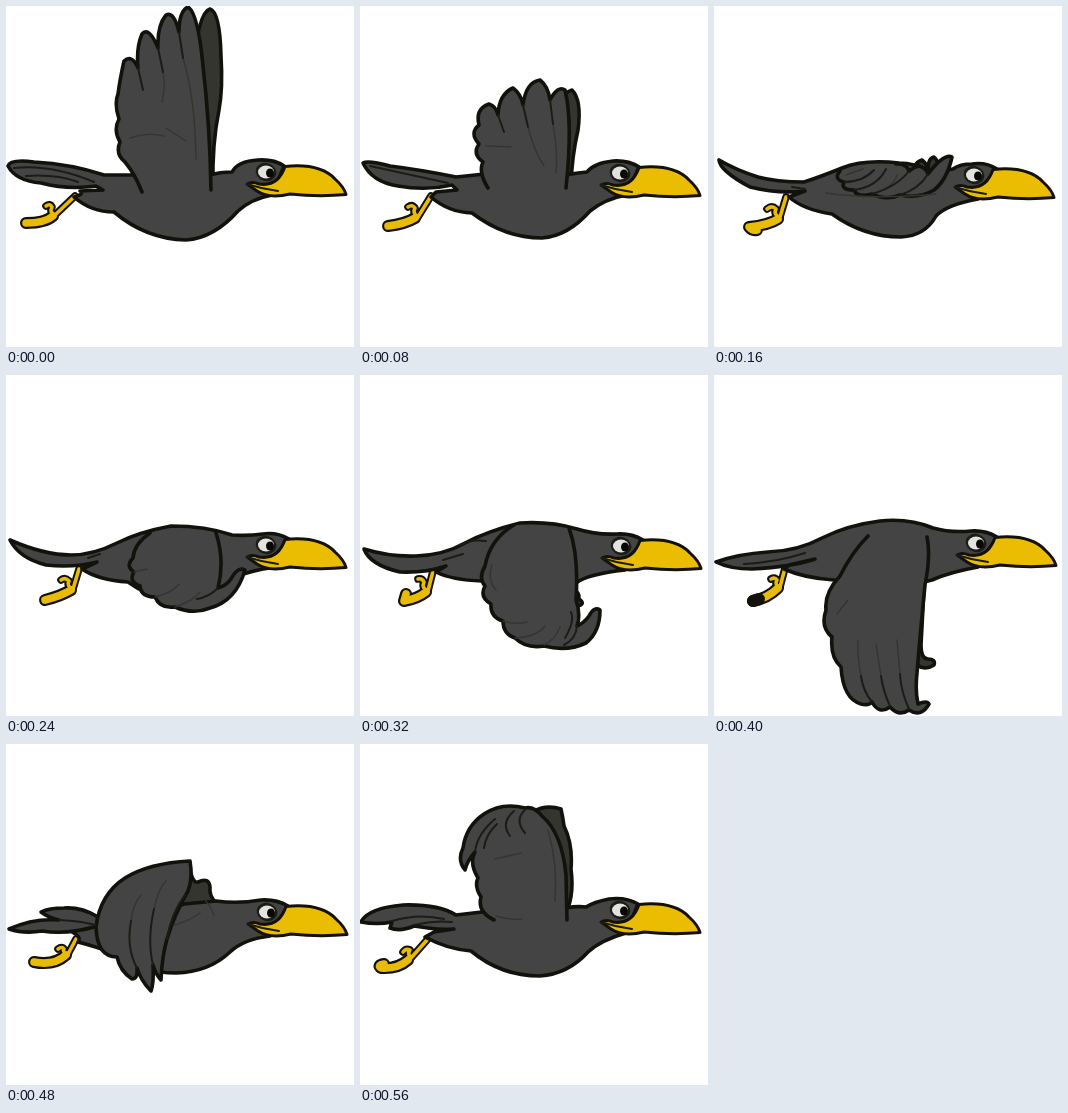
Write an HTML page that moves like this. It is 348 by 341 pixels and loops after 0.64 s.

```html
<!DOCTYPE html>
<html lang="en">
<head>
<meta charset="utf-8">
<title>Flying crow</title>
<style>
  html, body { margin: 0; width: 100%; height: 100%; overflow: hidden; background: #fff; }
  svg { display: block; width: 100%; height: 100%; }
  path { stroke-linecap: round; stroke-linejoin: round; }
  .plumage { fill: #444; stroke: #12120c; stroke-width: 3.6; }
  .far { fill: #353530; }
  .crease { fill: none; stroke: #1c1c16; stroke-width: 2; }
  .soft { fill: none; stroke: #343431; stroke-width: 1.4; }
  .legEdge { fill: none; stroke: #14110a; stroke-width: 7.6; }
  .leg { fill: none; stroke: #e8bb05; stroke-width: 3.6; }
  .toeEdge { fill: none; stroke: #14110a; stroke-width: 12; }
  .toe { fill: none; stroke: #e8bb05; stroke-width: 7.6; }
  .beak { fill: #eabd02; stroke: #14110a; stroke-width: 3; }
</style>
</head>
<body>
<svg id="stage" viewBox="0 0 348 341"></svg>
<script>
const STEP = 80;

// One entry per wing beat position; head is the offset of beak and eye.
const poses = [
  { // wings raised
    head: [0, 0],
    leg: 'M69 190L49 209Q43 207 46 201Q44 197 40 200', toe: 'M47 210Q39 217 20 217',
    far: 'M188 60Q192 7 204 3Q214 6 215 50Q217 82 213 104Q206 138 207 180L190 184',
    body: 'M278 160Q268 153 252 154Q232 155 226 166Q214 166 204 169L122 169L98 169Q65 158 28 156Q4 153 2 160Q10 175 35 177Q62 184 90 180L97 184L74 185Q79 188 68 191Q85 206 108 206Q140 233 180 234Q208 232 232 205Q245 193 266 189Z',
    near: 'M136 186Q129 168 119 156Q109 148 114 136Q107 124 113 113Q108 98 112 88Q114 73 118 55Q126 48 132 62Q130 42 136 28Q143 20 152 42Q151 20 160 9Q168 5 173 26Q173 5 182 1Q192 7 197 60Q204 120 205 184',
    crease: 'M132 62L137 84M152 42L157 66M173 26L177 52M8 162Q45 158 88 176M20 170Q50 168 72 176',
    soft: 'M157 66Q160 80 156 96M177 52Q189 90 190 153M124 132Q142 126 158 130M160 122L180 135'
  },
  { // wings coming down
    head: [0, 1],
    leg: 'M71 190L58 211Q52 207 55 202Q52 198 48 201', toe: 'M55 212Q45 218 28 220',
    far: 'M190 130Q197 88 212 84Q222 94 218 124Q212 150 211 178L188 180',
    body: 'M279 161Q268 154 253 155Q234 157 227 166Q216 167 206 169L125 168L96 171Q62 164 30 160Q8 154 3 157Q12 176 38 180Q66 185 92 179L97 184L76 186L71 191Q88 206 112 207Q145 232 182 232Q208 230 230 205Q245 193 266 189Z',
    near: 'M128 182Q118 166 123 156Q112 148 119 138Q109 127 119 119Q115 103 129 98Q136 100 138 109Q139 88 153 82Q161 88 163 99Q166 76 180 74Q188 80 190 94Q198 79 205 84Q213 116 206 182',
    crease: 'M138 109L144 126M163 99L168 121M190 94L193 118M10 160Q46 168 88 177',
    soft: 'M168 121Q174 145 184 160M193 118Q198 146 196 167M126 140L151 141'
  },
  { // wings level
    head: [0, 3],
    leg: 'M72 191L66 211Q59 209 62 203Q58 199 53 203', toe: 'M64 213Q55 219 35 221Q38 225 43 224',
    far: 'M200 168Q199 157 208 154Q214 159 214 164Q214 152 220 151Q227 157 222 169',
    body: 'M283 163Q272 156 258 158Q246 158 239 163L220 166Q200 157 185 157Q150 153 128 162Q106 171 90 176Q62 176 44 171Q22 164 5 154Q6 165 36 181Q64 188 91 185L75 191Q90 204 118 208Q150 231 187 231Q211 230 222 210Q232 199 264 193Z',
    near: 'M126 165Q119 173 130 176Q126 184 140 184Q143 192 158 188Q172 195 186 189Q205 193 220 184Q233 174 238 151Q230 147 214 168Q212 162 205 160Q200 161 195 165Q192 157 182 158',
    crease: 'M130 176Q149 176 160 164M140 184Q163 181 172 163M158 188Q184 180 195 165M186 189Q205 183 214 168M78 181L91 183',
    soft: 'M132 169L149 163M170 184Q181 177 183 169M112 187Q160 194 222 188'
  },
  { // wings just below the back
    head: [0, 4],
    leg: 'M73 194L67 214Q60 211 63 206Q59 202 55 205', toe: 'M65 215Q55 221 39 225',
    far: 'M215 198Q227 204 230 190L222 182',
    body: 'M283 164Q271 157 257 159Q242 161 226 160Q200 151 165 151Q133 157 111 168Q87 180 65 180Q38 180 4 165Q13 183 40 190Q67 193 91 187L76 194Q92 205 122 207Q155 230 190 229Q213 226 223 208Q234 197 264 193Z',
    near: 'M144 158Q128 169 127 183Q119 191 128 197Q122 206 134 211Q135 222 149 222Q154 234 169 232Q187 240 204 233Q230 226 239 195Q232 191 225 204Q220 211 212 213Q219 185 210 158',
    crease: 'M212 213Q203 222 191 224M82 183L94 179',
    soft: 'M149 222Q166 218 173 209M169 232Q187 226 194 217M128 197L141 194'
  },
  { // wings curling down
    head: [1, 5],
    leg: 'M73 196L68 216Q61 213 64 207Q62 203 58 204', toe: 'M66 217Q57 224 44 226L46 219',
    far: 'M213 215Q220 217 219 224Q226 229 218 231L209 229',
    body: 'M283 165Q271 158 257 159Q236 160 217 154Q190 146 160 148Q128 156 105 168Q84 180 56 181Q30 182 4 174Q10 190 40 197Q66 198 86 191L76 197Q92 205 122 206L190 220L216 208Q228 199 265 195Z',
    near: 'M154 150Q130 164 125 191Q118 203 125 211Q119 222 131 229Q130 242 143 246Q143 259 155 263Q166 274 184 271Q207 277 226 268Q240 257 240 235Q234 231 229 241Q224 248 217 251Q221 240 216 225Q219 180 209 153',
    crease: 'M217 251Q216 264 204 270M211 237Q215 246 205 263M83 185L103 179M100 170Q111 164 126 166',
    soft: 'M143 246Q155 250 167 247M155 263Q177 262 185 251M184 270Q195 265 200 252M132 190Q127 205 136 215'
  },
  { // wings fully down
    head: [2, 2],
    leg: 'M71 193L66 212Q60 210 63 205Q61 202 57 204', toe: 'M64 213Q54 223 39 226',
    far: 'M211 195L207 270Q207 284 214 284Q222 284 220 290Q211 296 203 290L198 205',
    body: 'M283 162Q271 155 257 156Q237 158 219 153Q195 143 166 146Q134 150 108 163Q84 176 54 177Q24 179 2 187Q16 194 38 194Q77 192 101 184L75 190L70 194Q90 203 120 205L190 212L218 205Q236 197 264 192Z',
    near: 'M154 161Q138 177 126 201Q110 218 112 235Q106 252 118 262Q116 282 127 292Q129 324 147 329Q155 331 158 327Q165 340 176 332Q185 342 195 335Q207 343 215 329Q213 325 204 329Q201 316 203 298Q207 250 211 210Q217 180 213 162',
    crease: 'M158 327Q149 316 147 301M176 331Q169 316 167 301M195 334Q187 317 186 299M30 189Q64 187 91 178',
    soft: 'M147 301Q143 280 144 266M167 301L162 269M186 299L183 265M123 239L134 225',
    darkToe: 'M39 226L45 224'
  },
  { // wings folding upwards
    head: [1, 2],
    leg: 'M70 195L62 210Q56 209 58 205Q56 202 52 205', toe: 'M60 211Q48 222 28 218',
    far: 'M184 125Q187 140 192 138Q203 133 204 143Q203 152 210 159L194 186L170 184',
    body: 'M282 162Q270 155 255 156Q232 160 210 157L178 160L150 170L92 173Q76 163 58 164Q43 164 35 168Q43 174 53 176Q27 174 3 185Q18 190 36 187Q61 191 92 182L66 188Q76 193 72 198Q91 203 104 208Q136 229 170 229Q203 228 224 208Q238 195 264 192Z',
    near: 'M90 183Q94 150 119 134Q143 119 184 117Q187 134 182 147Q168 171 161 195Q156 212 155 236Q149 229 147 221Q148 239 145 247Q135 237 131 224Q132 235 126 235Q114 227 111 213Q91 213 90 183',
    crease: 'M147 221Q141 196 148 165M131 224Q120 204 125 177M161 195Q165 169 179 151M53 176Q76 177 89 181',
    soft: 'M148 165Q152 145 160 137M125 177Q127 160 135 151M168 181Q181 178 194 169M186 144Q202 155 208 171'
  },
  { // wings opening upwards
    head: [0, 0],
    leg: 'M67 196L51 214Q47 210 50 206Q46 204 43 208', toe: 'M48 216Q38 225 21 224Q17 221 24 220',
    far: 'M172 68Q186 60 201 65Q203 74 204 82Q213 100 211 125Q214 148 208 164L206 176L190 178',
    body: 'M278 160Q266 153 249 155Q234 158 226 163Q216 162 206 164L122 168L96 171Q78 160 43 161Q8 164 1 178Q17 181 32 178L30 184Q40 188 54 182L68 184Q82 186 94 185L74 188L65 193Q87 205 111 207Q141 232 180 232Q208 230 228 208Q241 196 266 189Z',
    near: 'M134 176Q117 168 121 153Q114 142 118 134Q109 119 115 108Q107 117 105 126Q97 116 103 104Q106 82 124 70Q142 58 165 64Q174 62 182 72Q202 89 206 131L207 176',
    crease: 'M115 108Q117 90 135 75M124 104Q126 90 137 80M150 92Q140 79 154 67M165 89Q154 76 165 66M32 177Q58 169 84 175M54 181Q73 176 92 178',
    soft: 'M135 115L161 109M188 86Q198 120 195 157M136 172Q150 176 162 175'
  }
];

const path = (name, d) => `<path class="${name}" d="${d}"/>`;

const head = ([x, y]) => `<g transform="translate(${x} ${y})">
  <ellipse cx="260" cy="166" rx="10.5" ry="9" fill="#1c1c16" transform="rotate(18 260 166)"/>
  <ellipse cx="260" cy="166" rx="8" ry="6.5" fill="#e2e2e0"/>
  <ellipse cx="264" cy="167" rx="4" ry="4.6" fill="#080804"/>
  ${path('beak', 'M279 160.5Q314 157 329 173Q338 181 340 188.5Q313 191 284 188Q263 193 251 185L241 178Q246 175 253 178Q272 181 279 160.5Z')}
  ${path('crease', 'M241 178Q256 183 272 185')}
</g>`;

const drawPose = p => `<g display="none">
  ${path('legEdge', p.leg)}${path('toeEdge', p.toe)}${path('leg', p.leg)}${path('toe', p.toe)}
  ${p.darkToe ? path('toeEdge', p.darkToe) : ''}
  ${path('plumage far', p.far)}${path('plumage', p.body)}${path('plumage', p.near)}
  ${path('soft', p.soft)}${path('crease', p.crease)}${head(p.head)}
</g>`;

const stage = document.getElementById('stage');
stage.innerHTML = poses.map(drawPose).join('');
const groups = [...stage.children];
const start = performance.now();

function render(now) {
  const current = Math.floor(Math.max(0, now - start) / STEP) % poses.length;
  groups.forEach((group, i) => group.setAttribute('display', i === current ? 'inline' : 'none'));
  requestAnimationFrame(render);
}
render(start);
</script>
</body>
</html>
```
